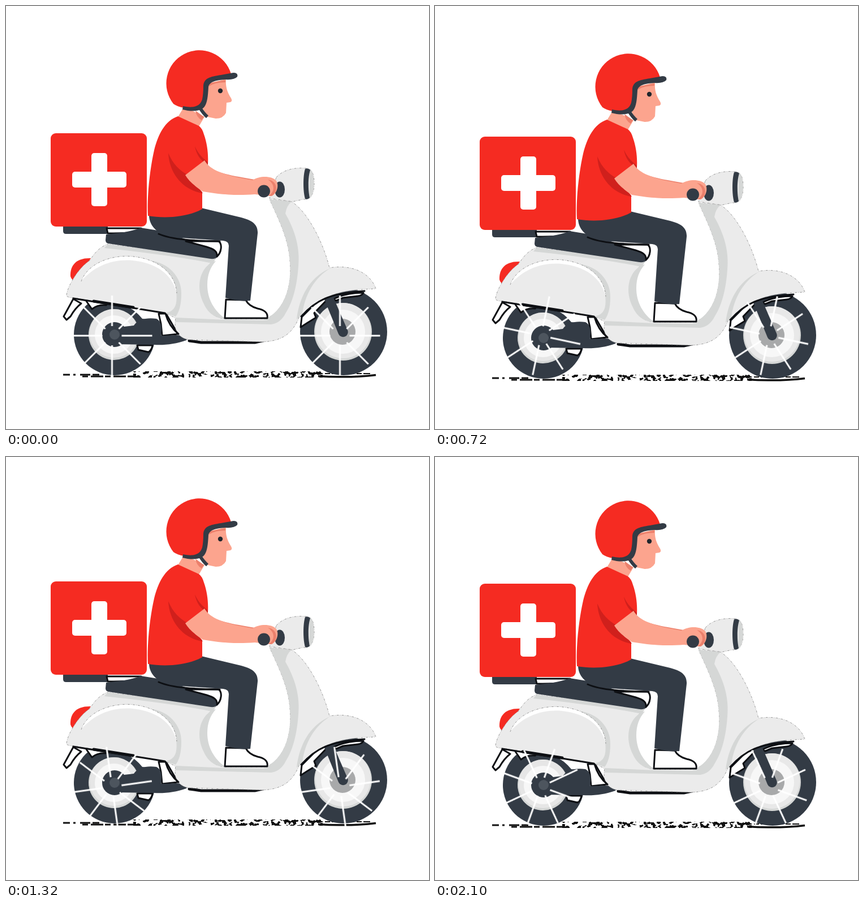
These frames come from a looping animation (748x748 px, 2.16 s). An HTML page without scripts:

```html
<!DOCTYPE html>
<html lang="en">
<head>
<meta charset="utf-8">
<title>Scooter delivery</title>
<style>
  html, body { margin: 0; width: 100%; height: 100%; overflow: hidden; background: #fff; }
  svg { display: block; width: 100vw; height: 100vh; }

  .red { fill: #f52b22; }
  .dark { fill: #333b45; }
  .body { fill: #ebebeb; }
  .shade { fill: #d5d7d6; }
  .skin { fill: #fca48e; }
  .blush { fill: #ec806c; }
  .deep { fill: #d0201c; }
  .white { fill: #fff; }
  .ink { fill: none; stroke: #0d0f13; stroke-width: 3; stroke-linejoin: round; stroke-linecap: round; }
  .bold { stroke-width: 5; }
  .gap { fill: #fff; stroke: #0d0f13; stroke-width: 3; stroke-linejoin: round; }
  .edge { stroke: #888; stroke-width: .8; stroke-dasharray: 4 2 1 2; }
  .road { fill: none; stroke: #111; }

  .bob { animation: bob 2160ms step-end infinite; }
  .spin { stroke: #fff; stroke-width: 3; animation: spin 2160ms steps(36) infinite; }

  @keyframes spin { to { transform: rotate(576deg); } }

  /* 8px sine wave, cut to whole pixels */
  @keyframes bob {
    0%, 50%, 100% { transform: translateY(0); }
    2.77%, 47.22% { transform: translateY(1px); }
    5.55%, 44.44% { transform: translateY(2px); }
    8.33%, 41.66% { transform: translateY(4px); }
    11.11%, 38.88% { transform: translateY(5px); }
    13.88%, 33.33% { transform: translateY(6px); }
    19.44%, 27.77% { transform: translateY(7px); }
    25% { transform: translateY(8px); }
    52.77%, 97.22% { transform: translateY(-1px); }
    55.55%, 94.44% { transform: translateY(-2px); }
    58.33%, 91.66% { transform: translateY(-4px); }
    61.11%, 88.88% { transform: translateY(-5px); }
    63.88%, 83.33% { transform: translateY(-6px); }
    69.44%, 77.77% { transform: translateY(-7px); }
    75% { transform: translateY(-8px); }
  }
</style>
</head>
<body>
<svg viewBox="0 0 748 748">
  <defs>
    <path id="spoke" d="M17 0H71"/>
    <g id="cross4">
      <use href="#spoke"/>
      <use href="#spoke" transform="rotate(90)"/>
      <use href="#spoke" transform="rotate(180)"/>
      <use href="#spoke" transform="rotate(270)"/>
    </g>
    <g id="spokes">
      <use href="#cross4"/>
      <use href="#cross4" transform="rotate(45)"/>
    </g>
    <filter id="grain" x="0" y="0" width="1" height="1" color-interpolation-filters="sRGB">
      <feTurbulence type="fractalNoise" baseFrequency=".13 .17" numOctaves="2" seed="4"/>
      <feColorMatrix values="0 0 0 0 .07  0 0 0 0 .07  0 0 0 0 .07  30 0 0 0 -15.3"/>
      <feComposite in2="SourceGraphic" operator="in"/>
    </filter>
  </defs>

  <g class="bob">
    <!-- ground -->
    <rect x="225" y="646" width="335" height="11" filter="url(#grain)"/>
    <path class="road" d="M101 652H165" stroke-width="3" stroke-dasharray="12 6 4 8 18 4"/>
    <path class="road" d="M135 655H230" stroke-width="3" stroke-dasharray="10 5 22 3"/>
    <path class="road" d="M548 650H645" stroke-width="2" stroke-dasharray="12 4 9 3"/>
    <path class="road" d="M552 654.500Q610 658 654 652.500" stroke-width="3.500"/>

    <!-- wheels -->
    <circle class="dark" cx="192" cy="581" r="72"/>
    <circle class="shade" cx="191" cy="581" r="45"/>
    <circle cx="191" cy="579" r="43" fill="#e6e6e6"/>
    <circle cx="191" cy="581" r="34" fill="#f7f7f7"/>
    <circle class="dark" cx="597" cy="576" r="77"/>
    <circle class="shade" cx="596" cy="576" r="51"/>
    <circle cx="596" cy="574" r="49" fill="#e8e8e8"/>
    <circle cx="596" cy="576" r="39" fill="#f7f7f7"/>
    <circle cx="595" cy="576" r="23" fill="#a8a9aa"/>

    <!-- rear flap and engine -->
    <path class="gap" d="M119 518L102 549L107 555L114 549C119 540 124 533 133 526Z"/>
    <path class="gap" d="M140 519L181 524L177 529C166 528 158 531 152 536Z"/>
    <path class="white" d="M212 530L281 543L277 557L241 553Q229 538 212 530Z"/>
    <path class="gap" d="M270 544L283 544L304 580L276 583L274 562Z"/>
    <path class="gap" d="M232 600H259Q258 608 252 612L234 608Z"/>
    <path class="dark" d="M192 569L226 565C234 553 250 551 266 553C276 558 276 570 274 583L300 582L322 583L319 591C300 598 280 600 262 599L192 598Z"/>
    <circle class="dark" cx="192" cy="581" r="22"/>
    <circle cx="192" cy="581" r="9" fill="#4d555e"/>

    <!-- front gap and fork -->
    <path class="gap" d="M523 550L521 568Q533 560 548 551L545 543L568 519L561 512Z"/>
    <path class="gap" d="M578 519C594 510 615 507 632 507Q630 512 622 513L596 516L584 521Z"/>
    <path class="dark" d="M561 514L577 511L604 573A8.500 8.500 0 0 1 588 580Z"/>

    <!-- frame -->
    <path class="ink bold" d="M324 592L345 595L440 595L462 590"/>
    <path class="red" d="M150 446C124 445 113 459 114 478Q116 485 123 487Z"/>
    <path class="body edge" d="M107 511C109 495 128 463 148 450C157 436 166 426 180 421L372 446C346 465 338 493 350 521C356 542 370 552 388 553H460C490 540 507 499 502 450C500 411 479 371 466 342L505 346C533 363 561 418 572 463C613 456 645 473 654 500C594 502 558 509 518 551C507 578 490 592 455 594L322 590C303 586 296 571 300 552L282 543L120 516C111 516 107 514 107 511Z"/>
    <path class="shade" d="M180 421L372 446L365 455C310 444 240 435 174 428Z"/>
    <path class="shade" d="M366 452C340 466 336 500 350 527C358 545 373 553 388 553C368 539 356 518 356 493C356 475 361 463 371 451Z"/>
    <path class="shade" d="M252 450C290 453 311 482 310 509Q310 536 300 549L281 543C301 540 303 526 301 505C299 479 280 459 252 450Z"/>
    <path class="white" d="M133 487C144 455 187 439 225 443C271 448 300 474 302 508C294 474 265 454 224 450C190 447 156 459 133 487Z"/>
    <path class="edge" fill="none" d="M133 487C144 455 187 439 225 443C271 448 300 474 302 508"/>
    <path class="shade" d="M300 551L388 555L462 556C486 548 496 531 501 510C500 542 489 560 469 563L300 559Z"/>
    <path class="shade" d="M466 342L505 346Q496 353 494 367C512 399 520 428 517 460C514 505 502 541 482 557L455 555C491 541 506 498 502 450C500 411 479 371 466 342Z"/>
    <path class="shade" d="M573 464C535 480 518 518 514 554L524 545C528 511 546 480 573 464Z"/>
    <path class="ink" d="M119 517L281 543"/>
    <path class="ink bold" d="M155 522L225 533"/>
    <path class="ink" d="M282 544Q288 566 305 580"/>
    <path class="ink" d="M522 549C548 520 572 508 634 504"/>

    <!-- seat -->
    <path class="dark" d="M101 388H180V403H106Q101 403 101 398Z"/>
    <path class="gap" d="M178 393H239L235 399Q225 402 180 402Z"/>
    <path class="dark" d="M177 404C199 401 220 400 238 392L275 398L365 428Q379 435 374 444Q369 449 355 446L181 420Q176 419 176 414Z"/>
    <path class="gap" d="M318 416H376C383 421 381 436 373 443C374 434 368 430 355 426Z"/>

    <!-- box -->
    <rect class="red" x="79" y="225" width="170" height="165" rx="9"/>
    <rect class="white" x="151" y="260" width="28" height="94" rx="5"/>
    <rect class="white" x="117" y="293" width="96" height="28" rx="5"/>

    <!-- legs -->
    <path class="gap" d="M389 519L387 552H462C464 542 455 537 445 535C434 532 427 526 424 520Z"/>
    <path class="dark" d="M253 371C254 390 268 404 296 409L384 415Q394 416 394 424L388 516Q410 523 432 521L445 402C446 386 435 379 416 374L345 357Z"/>
    <path class="ink" d="M270 403C295 414 335 415 378 416"/>

    <!-- headlamp -->
    <path class="body edge" d="M478 303C490 289 512 285 531 287C544 288 545 303 545 316C544 335 538 343 525 342L507 346L466 340Z"/>
    <path class="shade" d="M537 288C547 292 547 336 536 341Z"/>
    <path class="dark" d="M529 288Q534 286 538 290C534 302 534 326 537 339Q533 343 529 341C525 328 525 300 529 288Z"/>

    <!-- torso and arm -->
    <path class="skin" d="M315 178L304 196Q324 209 341 213L351 196Z"/>
    <path class="blush" d="M335 185L350 196L346 202Q337 197 335 185Z"/>
    <path class="red" d="M304 195L341 212Q347 216 350 227C356 244 358 262 357 279L330 310L347 329V359C320 374 280 376 251 371C249 340 254 290 262 255C269 227 281 203 304 195Z"/>
    <path class="deep" d="M287 260C295 280 308 291 320 298L348 331C317 327 289 300 287 260ZM334 248C340 262 349 270 357 276V284L350 276C342 270 336 260 334 248Z"/>
    <path class="blush" d="M356 281C370 296 400 300 440 307L430 315L365 303Z"/>
    <ellipse class="dark" cx="484" cy="324.500" rx="9" ry="14"/>
    <path class="skin" d="M317 299L351 273C361 290 383 299 436 308C450 299 470 301 477 308C484 316 479 332 470 336L440 333C400 336 372 332 348 328C333 318 323 309 317 299Z"/>
    <path class="blush" d="M463 307C481 309 482 330 469 336L464 336C477 328 475 314 463 307Z"/>
    <circle class="dark" cx="456" cy="327.500" r="11"/>

    <!-- head -->
    <path class="skin" d="M352 138L389 129C388 143 391 152 398 163Q401 168 397 170L390 171L389 189Q384 199 371 199L356 196L347 180Z"/>
    <path class="blush" d="M357 137L388 131V135Q369 135 359 142Z"/>
    <circle cx="379" cy="150" r="4.200" fill="#20262d"/>
    <path class="red" d="M314 180Q303 178 296 173A58.500 58.500 0 1 1 398 120L360 128Q354 131 352 141C352 161 349 180 335 182Z"/>
    <path class="dark" d="M349 141C350 128 360 125 380 122L402 118Q411 118 409 125Q404 131 388 130C373 131 360 133 358 143C357 160 356 171 351 178C344 187 327 187 312 183L313 177C331 181 343 178 347 165Q349 155 349 141Z"/>
    <path d="M343 180Q349 190 356 196" fill="none" stroke="#333b45" stroke-width="6"/>
  </g>

  <g transform="translate(187.5 583)"><g class="spin"><use href="#spokes"/></g></g>
  <g transform="translate(590.5 583)"><g class="spin"><use href="#spokes"/></g></g>
</svg>
</body>
</html>
```
